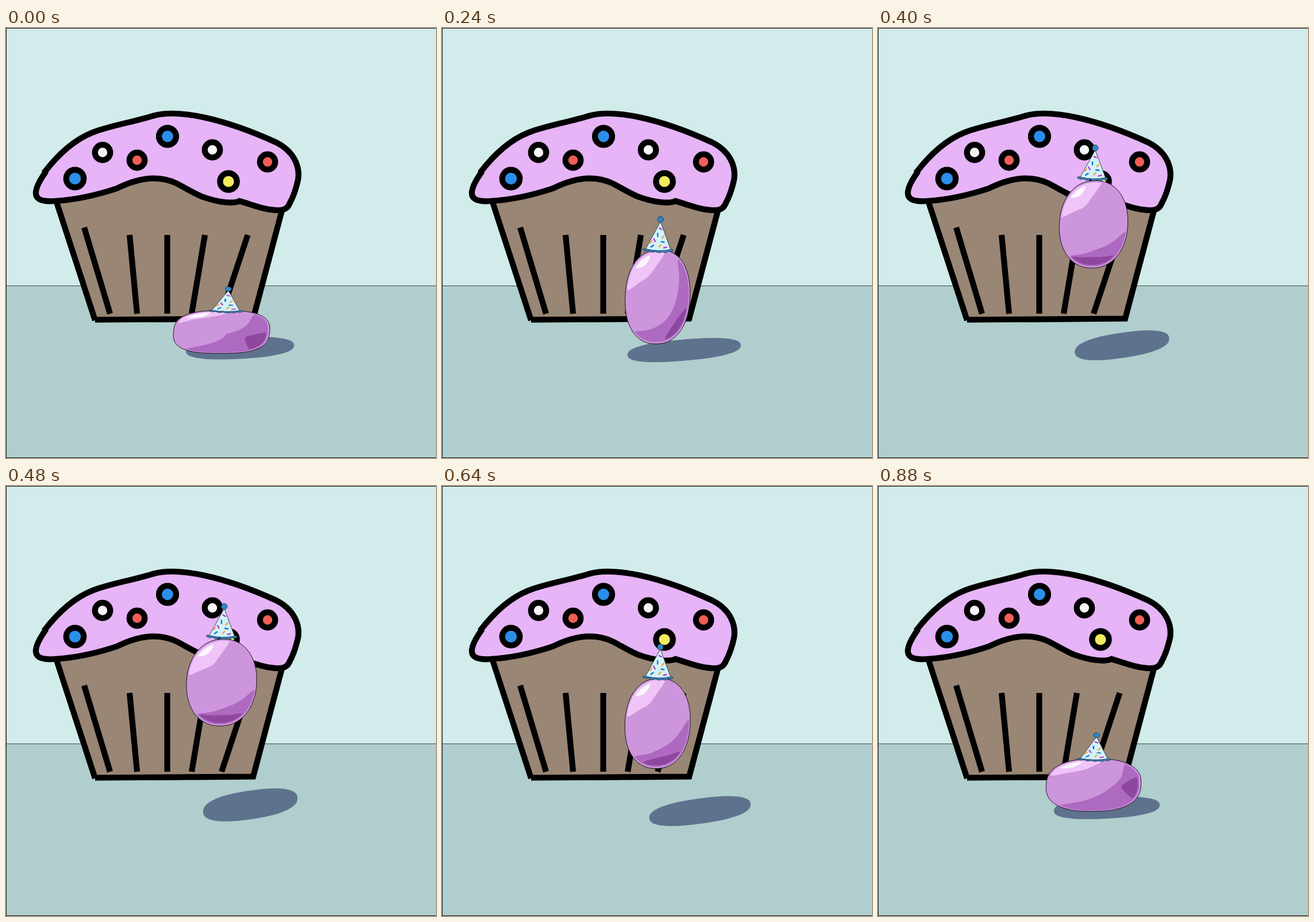
Recreate the animation shown at these times as an HTML page. Size 748 by 748 pixels, loop 0.96 s.

```html
<!DOCTYPE html>
<html lang="en">
<head>
<meta charset="utf-8">
<title>Bouncing ball with party hat</title>
<style>
html, body { margin: 0; width: 100%; height: 100%; overflow: hidden; }
svg { display: block; width: 100vw; height: 100vh; }
</style>
</head>
<body>
<svg viewBox="0 0 748 748">
  <rect width="748" height="748" fill="#d1ecea"/>
  <rect y="448.5" width="748" height="300" fill="#b0cecd"/>
  <path d="M0 448.5H748" stroke="#3c4848"/>
  <path d="M748 .5H.5V747.500H748" fill="none" stroke="#111"/>

  <g id="cake" stroke="#000" stroke-width="10.2">
    <path d="M88 300L155 508L430 505.5L482 310V260H88Z" fill="#998675" stroke="none"/>
    <path d="M87 300L155 508.5M155 507.5L430 505.5L482 310" fill="none"/>
    <path d="M136 347L181 497M215 360L228 497M280.500 360V497M346 360L323 497M420.500 360L375 497"/>
    <path fill="#e6b4f7" d="M66 252C92 218 120 194 150 182C180 170 220 164 255 153C300 140 380 158 470 199
      C500 214 512 240 508 264C504 282 500 293 494 304C490 314 484 317 474 317C450 317 428 307 406 301
      C396 306 370 304 340 293C322 285 310 277 296 270C262 254 225 263 193 279C160 290 120 299 85 301
      C58 303 51 296 52 285C53 275 62 260 70 249"/>
  </g>

  <path id="shadow" fill="#5e728d"/>
  <path id="body" fill="#cd95dc" stroke="#1c1020"/>
  <path id="shade" fill="#ae69c0"/>
  <path id="dark" fill="#8d479f"/>
  <path id="light" fill="#efc4f8"/>
  <path id="shine" fill="#fbf6fb"/>
  <g id="hat" stroke="#26343f" stroke-width=".9">
    <path d="M4.500 -47L-22.500 -1Q1 4 23.500 1Z" fill="#d2f2fa"/>
    <g stroke-width="2.4">
      <path stroke="#c135cd" d="M1.500 -36.500l6 3M-8 -19l3.500 6M9.500 -3l7 -1.500"/>
      <path stroke="#1b70c2" d="M-.5 -28v7M5 -13.500l7 1M-13.500 -4l6 -4"/>
      <path stroke="#f0a540" d="M6.500 -18.500l5 -5M-15 -10.500l4.500 -5M1 -4l5 -5"/>
    </g>
    <path fill="#2e86c8" d="M-28 -.5Q-26 -3 -21 -1Q1 4 24 -.5Q28 -1 27 2Q24 5 19 2.500Q14 7 8 3.500
      Q1 7 -4 3Q-12 6 -16 1.500Q-23 4 -28 -.5Z"/>
    <circle cx="4.5" cy="-50.5" r="5.2" fill="#2e86c8"/>
  </g>
</svg>
<script>
const STEP = 80, COUNT = 12, CENTER = 375, GROUND = 566;
const NS = 'http://www.w3.org/2000/svg';
const $ = id => document.getElementById(id);

// Candy dots by colour: [x, y, ring radius]
const candy = {
  '#2b8fea': [[120, 262, 15.3], [281, 188.5, 15]],
  '#f2eb5e': [[387, 267, 14.7]],
  '#f7f5f7': [[168, 216.5, 13.3], [359, 212, 13.3]],
  '#ef5f55': [[228, 230, 13.3], [455, 233, 13.3]]
};
for (const fill in candy)
  for (const [cx, cy, r] of candy[fill]) {
    const dot = document.createElementNS(NS, 'circle');
    for (const [k, v] of Object.entries({ cx, cy, r, fill })) dot.setAttribute(k, v);
    $('cake').append(dot);
  }

// Key poses of the bounce. shade and dark are the angles where the shading
// ends; shadow is cx, cy, rx, ry. Everything else follows from these.
const squash = { at: 0, top: 491.5, bottom: 566, width: 167, hat: 382, shade: -52, dark: 2, shadow: [407, 557, 94, 18.5] };
const rise = { at: 2, top: 445, bottom: 566, width: 129, hat: 378.5, shade: -43, dark: 3, shadow: [410.5, 564, 87, 21] };
const leap = { at: 4, top: 326.5, bottom: 533, width: 96, hat: 373, shade: -65, dark: 26, shadow: [432, 556.5, 110, 16] };
const hover = { at: 5, top: 265.5, bottom: 417.5, width: 119, hat: 373.5, shade: 10, dark: 49, shadow: [424.5, 552, 82, 22] };
const hang = { ...hover, at: 7, top: 267, width: 125, hat: 377, shadow: [425.5, 557.5, 82, 28] };
const fall = { at: 9, top: 402, bottom: 565.5, width: 102, hat: 374, shade: -21, dark: 32, shadow: [472, 573.5, 94, 16] };
const land = { ...squash, at: 11, top: 474.5, width: 165, hat: 375.5, dark: -19, shadow: [398, 560, 92, 18.5] };
const keys = [squash, rise, leap, hover, hang, fall, land, { ...squash, at: COUNT }];

const mix = (a, b, k) => Array.isArray(a) ? a.map((v, i) => mix(v, b[i], k)) : a + (b - a) * k;

function poseAt(i) {
  const next = keys.findIndex(key => key.at > i), a = keys[next - 1], b = keys[next];
  const k = (i - a.at) / (b.at - a.at), pose = {};
  for (const name in a) pose[name] = mix(a[name], b[name], k);
  return pose;
}

// Superellipse addressed by angle in degrees and relative radius
function blob(cx, cy, rx, ry, power, shearX, shearY) {
  return (deg, radius) => {
    const c = Math.cos(deg * Math.PI / 180), s = Math.sin(deg * Math.PI / 180);
    const r = radius * (Math.abs(c) ** power + Math.abs(s) ** power) ** (-1 / power);
    const u = c * r, v = s * r;
    return [cx + u * rx + v * shearX, cy + v * ry + u * shearY].map(n => n.toFixed(2));
  };
}

const polygon = points => 'M' + points.join('L') + 'Z';
const outline = at => polygon(Array.from({ length: 120 }, (_, k) => at(k * 3, 1)));

// Crescent along the rim between two angles, swelling inwards by depth
function crescent(at, from, to, edge, depth) {
  const outer = [], inner = [], n = 40;
  for (let k = 0; k <= n; k++) {
    const deg = mix(from, to, k / n), swell = Math.max(0, Math.sin(Math.PI * k / n)) ** .65;
    outer.push(at(deg, edge));
    inner.unshift(at(deg, edge - depth * swell));
  }
  return polygon(outer.concat(inner));
}

function draw(i) {
  const { top, bottom, width, hat, shade, dark, shadow } = poseAt(i);
  const q = Math.log(width / (bottom - top)), flat = Math.max(q, 0);
  const lift = GROUND - bottom;
  const ball = blob(CENTER, (top + bottom) / 2, width / 2, (bottom - top) / 2, 2.1 + 1.1 * q * q, -3, 0);
  const ground = blob(...shadow, 2.4, 0, -5 - Math.min(lift, 33) / 5);
  const shapes = {
    shadow: outline(ground),
    body: outline(ball),
    shade: crescent(ball, 132, shade, .96, .35 + .55 * q * q + .15 * flat),
    dark: crescent(ball, dark + 50 + .6 * Math.max(dark, 0), dark, .93, .18 + .27 * flat),
    light: crescent(ball, 193 + 14 * q, 281, .96, .5 - .38 * q * q),
    shine: crescent(ball, 221, 253, .91, .14)
  };
  for (const id in shapes) $(id).setAttribute('d', shapes[id]);

  const wide = (54.5 + 5 * q) / 55, tall = (51 - 4 * q - 12 * flat) / 50.5;
  $('hat').setAttribute('transform', `translate(${hat} ${top + .5 - lift / 28}) scale(${wide} ${tall})`);
}

let start = null, shown = 0;
function tick(now) {
  if (start === null) start = now;
  const i = Math.floor(Math.max(0, now - start) / STEP) % COUNT;
  if (i !== shown) draw(shown = i);
  requestAnimationFrame(tick);
}
draw(0);
requestAnimationFrame(tick);
</script>
</body>
</html>
```
